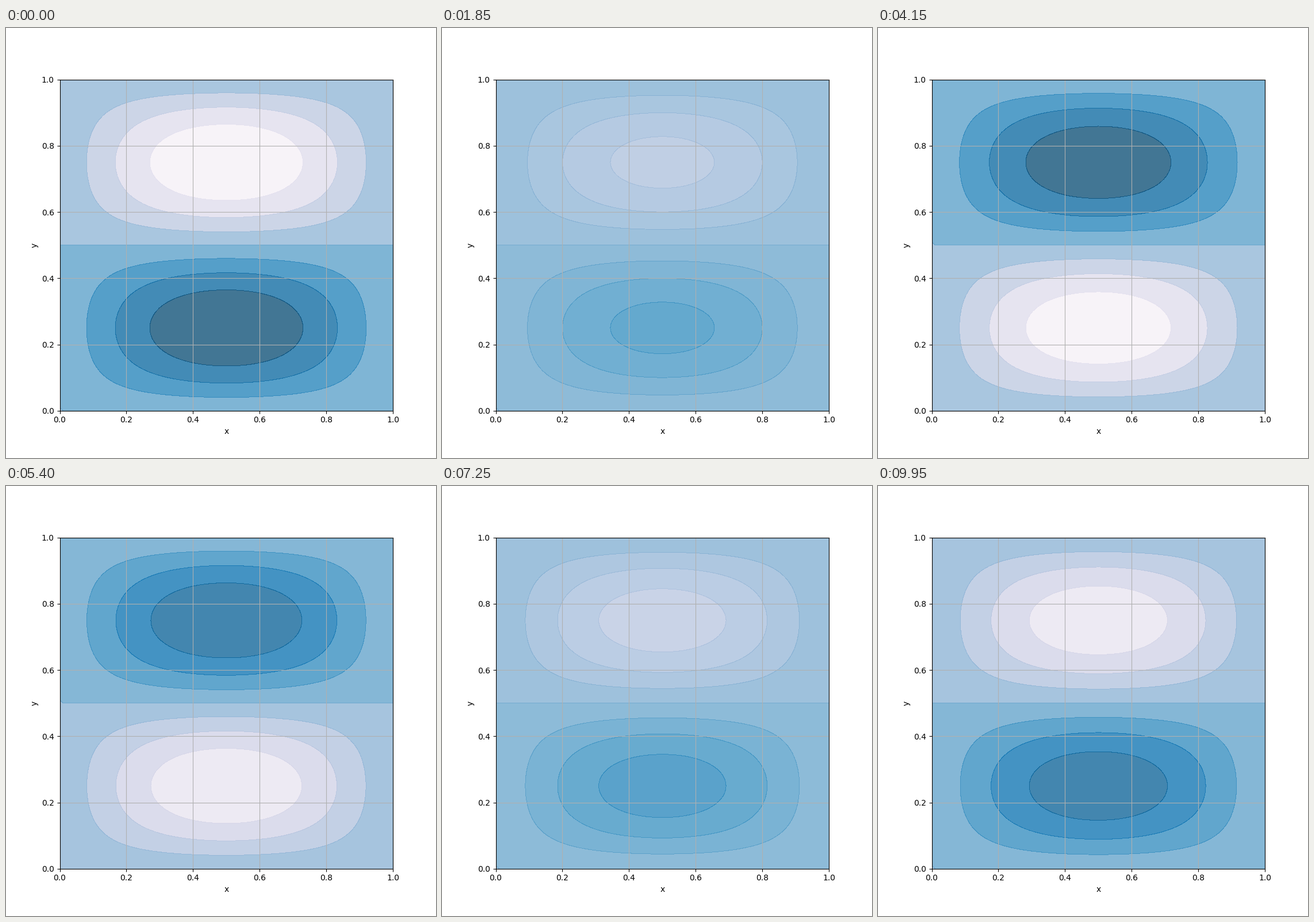
A matplotlib script for the animation above (10000 ms loop, 748x748 px).

```python
import numpy as np
import matplotlib.pyplot as plt
from matplotlib.animation import FuncAnimation

SIZE, DPI = 748, 100
FRAMES, INTERVAL = 200, 50

# Standing wave on the unit square, mode (1, 2)
OMEGA = np.pi * np.sqrt(5) / FRAMES   # phase per frame
LAG = 0.005
DAMPING = OMEGA ** 2 / 20             # slight loss of amplitude per frame

axis = np.linspace(0, 1, 101)
X, Y = np.meshgrid(axis, axis)
MODE = np.sin(np.pi * X) * np.sin(2 * np.pi * Y)

fig, ax = plt.subplots(figsize=(SIZE / DPI, SIZE / DPI), dpi=DPI)
ax.set(xlim=(0, 1), ylim=(0, 1), xlabel="x", ylabel="y")
ax.grid(True)

contours = None


def amplitude(i):
    return np.exp(-DAMPING * i) * np.cos(OMEGA * i - LAG)


def draw(i):
    global contours
    if contours is not None:
        contours.remove()
    contours = ax.contourf(X, Y, amplitude(i) * MODE, cmap="PuBu",
                           alpha=0.75, vmin=-1, vmax=1)
    return [contours]


anim = FuncAnimation(fig, draw, frames=FRAMES, interval=INTERVAL,
                     init_func=lambda: [], repeat=True, repeat_delay=0)

plt.show()
```
